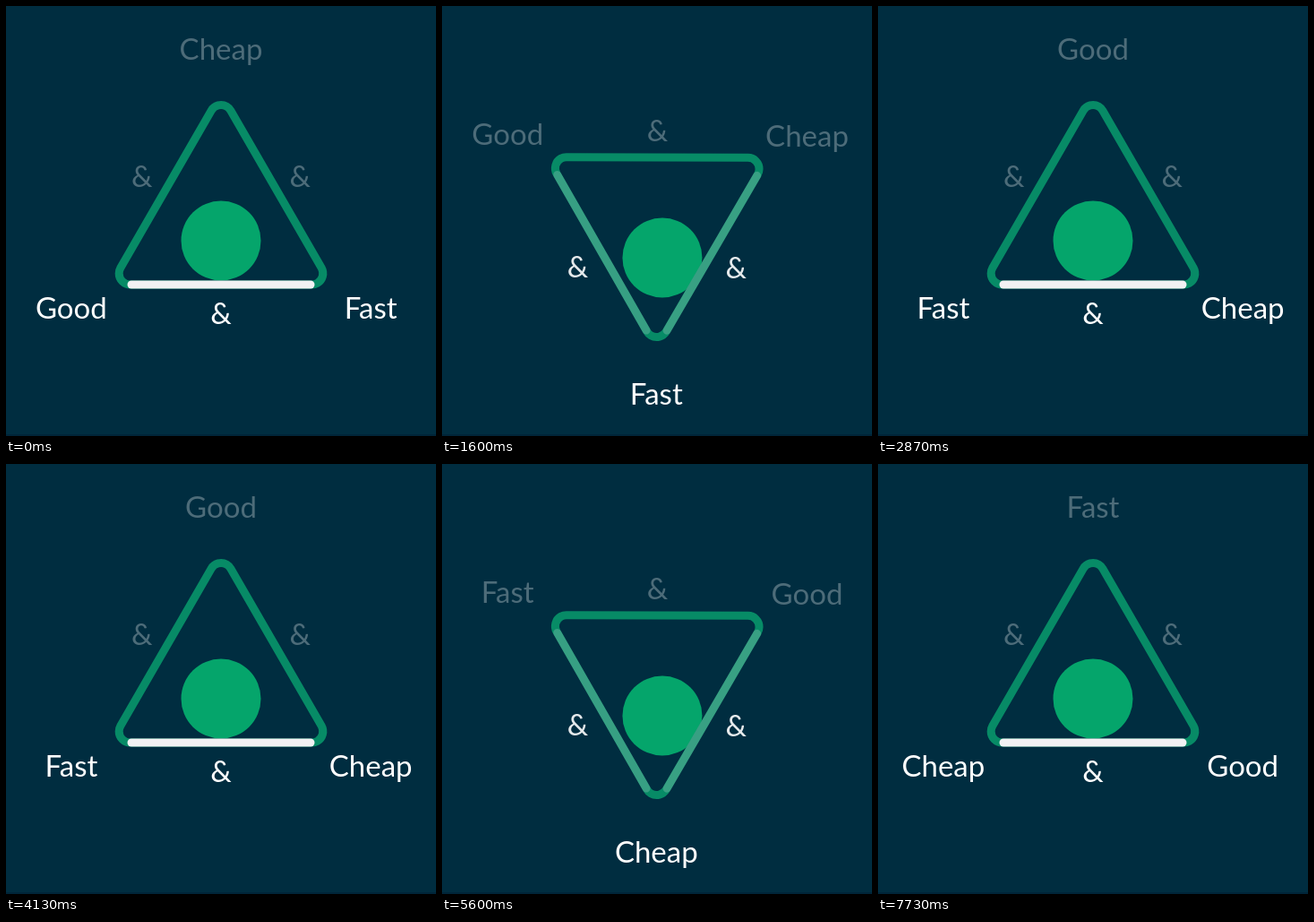
Recreate the animation shown at these times as an HTML page with a canvas. Size 480 by 480 pixels, loop 8 s.

```html
<!DOCTYPE html>
<html lang="en">
<head>
<meta charset="utf-8">
<title>Pick two</title>
<style>
  html, body { margin: 0; width: 100%; height: 100%; overflow: hidden; background: #002d40; }
  canvas { display: block; width: 100vmin; height: 100vmin; }
</style>
</head>
<body>
<canvas id="stage" width="480" height="480"></canvas>
<script>
const ctx = document.getElementById('stage').getContext('2d');
const CENTER = 240, STEP = 4000, LOOP = 8000;
const TURN_START = 460, TURN_TIME = 2280;
const INSET = 71, CORNER = 12.5, STROKE = 9, HALF_SIDE = 100;
const WORD_RADIUS = 193, AMP_RADIUS = 102, DIM = 0.3;
const WORDS = ['Good', 'Fast', 'Cheap'];

const rad = deg => deg * Math.PI / 180;
const clamp = v => Math.min(1, Math.max(0, v));
const mix = (a, b, k) => a + (b - a) * k;

function ramp(t, from, to) {
  const k = clamp((t - from) / (to - from));
  return k * k * (3 - 2 * k);
}

// Symmetric cubic bezier (0.75, 0, 0.25, 1), solved by bisection.
function ease(x) {
  if (x <= 0 || x >= 1) return clamp(x);
  let lo = 0, hi = 1;
  for (let i = 0; i < 30; i++) {
    const s = (lo + hi) / 2, r = 1 - s;
    const bx = 2.25 * r * r * s + 0.75 * r * s * s + s * s * s;
    if (bx < x) lo = s; else hi = s;
  }
  return lo * lo * (3 - 2 * lo);
}

function label(text, deg, radius, lit) {
  ctx.globalAlpha = mix(DIM, 1, lit);
  ctx.fillStyle = '#fff';
  ctx.fillText(text,
    CENTER + radius * Math.cos(rad(deg)),
    CENTER + 12.5 + radius * Math.sin(rad(deg)));
  ctx.globalAlpha = 1;
}

function outline(turn) {
  ctx.save();
  ctx.translate(CENTER, CENTER);
  ctx.rotate(rad(turn));
  ctx.beginPath();
  for (const deg of [-90, 30, 150]) {
    const d = 2 * (INSET - CORNER);
    ctx.arc(d * Math.cos(rad(deg)), d * Math.sin(rad(deg)), CORNER, rad(deg - 60), rad(deg + 60));
  }
  ctx.closePath();
  ctx.strokeStyle = '#078b66';
  ctx.stroke();
  ctx.restore();
}

function litSide(deg, lit) {
  if (lit <= 0) return;
  ctx.save();
  ctx.translate(CENTER, CENTER);
  ctx.rotate(rad(deg - 90));
  ctx.globalAlpha = lit;
  ctx.strokeStyle = '#f2f1f3';
  ctx.beginPath();
  ctx.moveTo(-HALF_SIDE, INSET);
  ctx.lineTo(HALF_SIDE, INSET);
  ctx.stroke();
  ctx.restore();
}

function ball(k) {
  const s = Math.sin(Math.PI * k), c = Math.cos(Math.PI * k);
  const x = s * (6 + 12 * c - 7 * c * c);
  const y = 22 + 19 * s ** 3;
  ctx.fillStyle = '#05a56b';
  ctx.beginPath();
  ctx.arc(CENTER + x, CENTER + y, 44.5, 0, 2 * Math.PI);
  ctx.fill();
}

function draw(time) {
  const step = Math.floor(time / STEP), t = time % STEP;
  const k = ease((t - TURN_START) / TURN_TIME);
  const turn = 120 * k;

  ctx.fillStyle = '#002d40';
  ctx.fillRect(0, 0, 480, 480);
  ctx.fillStyle = '#002539';
  ctx.fillRect(0, 478, 480, 2);

  ctx.font = '33px Lato, sans-serif';
  ctx.textAlign = 'center';
  ctx.lineWidth = STROKE;
  ctx.lineCap = 'round';

  ball(k);
  outline(turn);
  litSide(90 + turn, 1 - ramp(t, 1180, 1770));
  litSide(-30 + turn, ramp(t, 1430, 2020));

  label('&', 90 + turn, AMP_RADIUS, 1 - ramp(t, 1490, 1950));
  label('&', -30 + turn, AMP_RADIUS, ramp(t, 1250, 1710));
  label('&', 210 + turn, AMP_RADIUS, 0);

  const word = i => WORDS[(i + step) % 3];
  label(word(0), 150 + turn, WORD_RADIUS, 1 - ramp(t, 1150, 1550));
  label(word(1), 30 + turn, WORD_RADIUS, 1);
  label(word(2), -90 + turn, WORD_RADIUS, ramp(t, 1650, 2050));
}

const start = performance.now();
function tick() {
  draw((performance.now() - start) % LOOP);
  requestAnimationFrame(tick);
}
tick();
</script>
</body>
</html>
```
